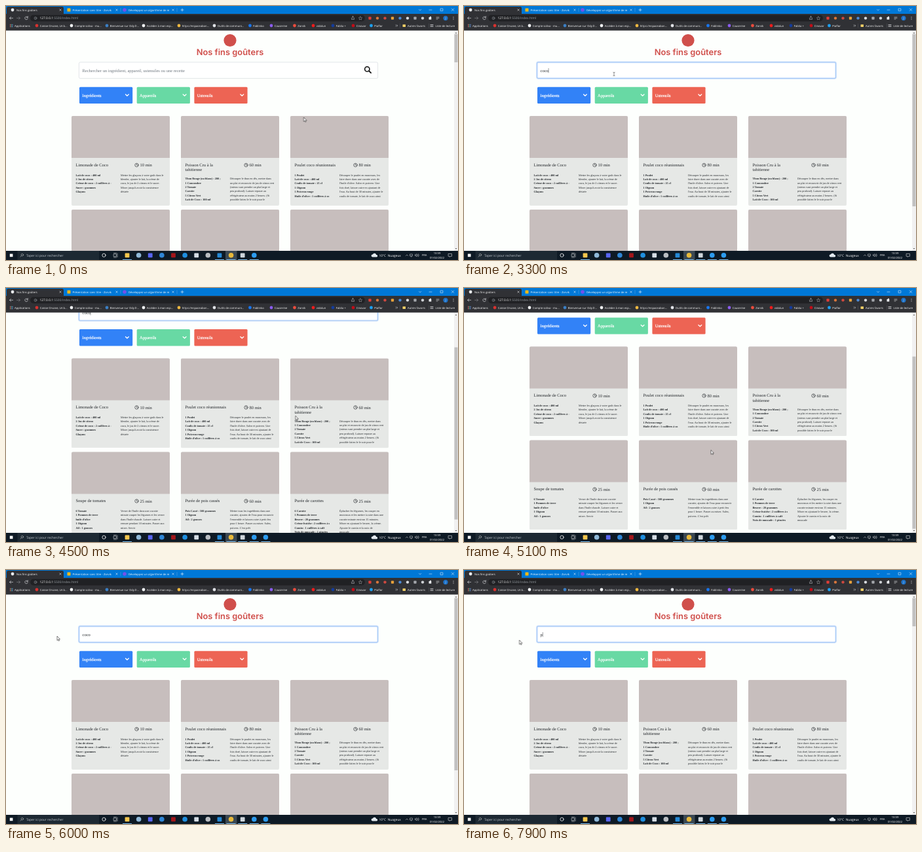
Animation, 690 px wide and 388 px high, one loop 8000 ms. Source, as an HTML page:

```html
<!DOCTYPE html>
<html lang="fr">
<head>
<meta charset="utf-8">
<title>Nos fins goûters</title>
<style>
  @property --scroll { syntax: '<number>'; inherits: true; initial-value: 0; }
  html, body { margin: 0; width: 100%; height: 100%; overflow: hidden; background: #fdfffd; }
  #stage { display: block; width: 690px; height: 388px; animation: scroll 8s linear infinite; }
  text { text-rendering: geometricPrecision; white-space: pre; }
  .ui { font-family: 'Open Sans', 'Noto Sans', sans-serif; font-size: 4.2px; fill: #fff; }
  .serif { font-family: 'Liberation Serif', Tinos, serif; font-size: 6.5px; fill: #212529; }
  .small { font-size: 4.25px; }
  .bold { font-weight: 700; }
  .menu { fill: #fff; stroke: #fff; stroke-width: .2px; }
  .brand { font: 600 12.9px Inter, sans-serif; fill: #d04f4b; text-anchor: middle; }
  .mid { text-anchor: middle; }
  .line { fill: none; stroke-linecap: round; stroke-linejoin: round; }
  #page { transform: translateY(calc(var(--scroll) * -1px)); }
  #thumb { transform: translateY(calc(var(--scroll) * .786px)); }
  #ring { animation: focus 8s linear infinite; }
  #pointer { animation: pointer 8s linear infinite; }
  .right { animation: right 8s step-end infinite; }
  .left { animation: left 8s step-end infinite; }

  @keyframes scroll {
    0%, 50% { --scroll: 0; }
    51.25% { --scroll: 6; }
    53.75% { --scroll: 32; }
    56.25% { --scroll: 60.5; }
    58.75% { --scroll: 76; }
    60%, 66.25% { --scroll: 78.5; }
    68.75% { --scroll: 40; }
    71.25%, 100% { --scroll: 0; }
  }
  @keyframes focus {
    0%, 17.5% { opacity: 0; }
    21.25%, 100% { opacity: 1; }
  }
  @keyframes right {
    0% { transform: none; }
    40% { transform: translateX(167px); }
    96.25%, 100% { transform: none; }
  }
  @keyframes left {
    0% { transform: none; }
    40% { transform: translateX(-167px); }
    96.25%, 100% { transform: none; }
  }
  @keyframes pointer {
    0%, 1.25% { transform: translate(454.5px, 170px); }
    3.75%, 6.25% { transform: translate(370px, 376px); }
    10% { transform: translate(318px, 262px); }
    13.75% { transform: translate(238px, 122px); }
    15%, 38.75% { transform: translate(228px, 103.5px); }
    40%, 50% { transform: translate(229px, 104px); }
    53.75% { transform: translate(370px, 165px); }
    56.25% { transform: translate(442px, 195px); }
    60% { transform: translate(405px, 235px); }
    63.75%, 66.25% { transform: translate(377px, 247.5px); }
    72.5% { transform: translate(94px, 107px); }
    73.75%, 83.75% { transform: translate(78px, 101px); }
    85%, 100% { transform: translate(84.5px, 107px); }
  }
</style>
</head>
<body>
<svg id="stage" viewBox="0 0 690 388" xmlns="http://www.w3.org/2000/svg"></svg>
<script>
const LOOP = 8000;
let css = '', count = 0;

// Returns a class that is visible only during the given [start, end] spans in ms.
function during(...spans) {
  const id = 'on' + count++;
  const at = (t, v) => t < LOOP ? `${t / LOOP * 100}%{opacity:${v}}` : '';
  css += `@keyframes ${id}{0%{opacity:0}${spans.map(([a, b]) => at(a, 1) + at(b, 0)).join('')}}
    .${id}{animation:${id} 8s step-end infinite}`;
  return id;
}

const rect = (x, y, w, h, fill, r = 0, cls = '') =>
  `<rect class="${cls}" x="${x}" y="${y}" width="${w}" height="${h}" rx="${r}" fill="${fill}"/>`;
const dot = (x, y, r, fill) => `<circle cx="${x}" cy="${y}" r="${r}" fill="${fill}"/>`;
const ring = (x, y, r, color, w) => `<circle class="line" cx="${x}" cy="${y}" r="${r}" stroke="${color}" stroke-width="${w}"/>`;
const line = (d, color, w = .6) => `<path class="line" d="${d}" stroke="${color}" stroke-width="${w}"/>`;
const label = (x, y, str, cls = 'ui', style = '') => `<text class="${cls}" x="${x}" y="${y}" style="${style}">${str}</text>`;
const group = (inner, attrs = '') => `<g ${attrs}>${inner}</g>`;
const cross = (x, y, r, color) => line(`M${x - r} ${y - r}l${2 * r} ${2 * r}m0 ${-2 * r}l${-2 * r} ${2 * r}`, color, .5);

function tabs() {
  const close = [83, 169, 255].map(x => cross(x, 6, 1.2, '#fff')).join('');
  return rect(0, 0, 690, 13, '#0078d7') + rect(1, 1, 87, 14, '#303135', 2.5) +
    dot(10, 6, 2.4, '#e8eaed') + label(16, 7.6, 'Nos fins goûters') +
    rect(93.5, 3.5, 5, 5, '#f5ba15', .6) + label(101.5, 7.6, 'Présentation sans titre - Zorvik') +
    dot(181, 6, 2.8, '#7451eb') + label(187, 7.6, 'Développez un algorithme de re') +
    close + line('M175 3.5v5M261 3.5v5', '#7fb5e8', .4) +
    line('M269 4v4M267 6h4', '#fff', .6) +
    line('M630.5 5.2l1.6 1.6 1.6-1.6M646 6h4M663.5 4h3.4v3.4h-3.4z', '#fff', .5) + cross(682, 5.7, 1.8, '#fff');
}

function toolbar() {
  const addons = ['#e23d36', '#d9763c', '#cf4940', '#e9a23b', '#4c8bd8', '#d9dce0', '#a5a8ad', '#d0d3d7'];
  return rect(0, 12, 690, 25.5, '#303135') +
    line('M10.5 18.5h-5l2-2m-2 2l2 2', '#e8eaed') + line('M16.5 18.5h5l-2-2m2 2l-2 2', '#8a8c90') +
    line('M33 17.2a2.3 2.3 0 1 0 .3 2M33.3 15.8v1.8h-1.8', '#e8eaed') +
    rect(37, 13.8, 511, 9.6, '#202124', 4.8) +
    ring(45, 18.6, 2, '#9aa0a6', .5) + line('M45 18.4v1.2M45 17.4v.1', '#9aa0a6', .5) +
    label(51.5, 20.3, '127.0.0.1<tspan fill="#9aa0a6">:5500/index.html</tspan>', 'ui', 'font-size:4.85px') +
    line('M527.5 18v2.5h4V18m-2 1v-3.4m-1 1l1-1 1 1', '#c8cbd0', .5) +
    line('M541 16l.8 1.7 1.9.2-1.4 1.3.4 1.9-1.7-.9-1.7.9.4-1.9-1.4-1.3 1.9-.2z', '#c8cbd0', .4) +
    addons.map((c, i) => i % 3 ? dot(555.5 + i * 11.5, 18.6, 2.2, c) : rect(553.4 + i * 11.5, 16.5, 4.2, 4.2, c, .8)).join('') +
    rect(645.5, 17, 3.8, 3.8, '#e8eaed', .5) + dot(648, 16.8, 1, '#e8eaed') +
    line('M657 17h4M657 18.6h4M657 20.2h2', '#e8eaed', .5) + dot(671, 18.6, 3.6, '#1d72c9') +
    label(671, 20, 'J', 'ui mid') + [16.8, 18.6, 20.4].map(y => dot(683, y, .5, '#e8eaed')).join('');
}

function bookmarks() {
  const items = [
    [47, '#d8322f', 'Caisse Orvane, LA b...'], [100, '#f1f3f4', 'Compte soliva - mu...'],
    [154, '#3b7fc4', 'Bienvenue sur Ody.fr...'], [210, '#f1f3f4', 'Accéder à mon esp...'],
    [264, '#f0b840', 'https://espaceabon...'], [318, '#dfe1e5', 'Outils de communi...'],
    [372.5, '#1877f2', 'Fablinko'], [405, '#8b5cf0', 'Causerine'], [440.5, '#eb4c3d', 'Zorvik'],
    [469, '#f01c1c', 'vidolun'], [499, '#143c9c', 'Fablia +'], [530, '#c20d18', 'Cinovar'], [557.5, '#1da1f2', 'Piaflor']
  ];
  const grid = [0, 1, 2, 3, 4, 5, 6, 7, 8].map(i =>
    rect(6 + i % 3 * 1.7, 27.8 + (i / 3 | 0) * 1.7, 1.1, 1.1, ['#e66', '#5b9', '#69e'][i % 3])).join('');
  return grid + label(13, 31.6, 'Applications') +
    items.map(([x, c, s]) => dot(x, 30, 2.4, c) + label(x + 4.8, 31.6, s)).join('') +
    line('M595 28.8l1.2 1.2-1.2 1.2m1.8-2.4l1.2 1.2-1.2 1.2', '#e8eaed', .5) + line('M601.5 27v6M645.5 27v6', '#5f6368', .4) +
    rect(605.5, 28.2, 4.5, 3.8, '#f3d067', .4) + label(613, 31.6, 'Autres favoris') +
    line('M648 28.5h4M648 30h4M648 31.5h4', '#e8eaed', .6) + label(655.5, 31.6, 'Liste de lecture');
}

const clock = (x, y) => ring(x, y, 2.7, '#212529', .65) + line(`M${x} ${y - 1.6}v1.7l1.1.7`, '#212529', .6);

function card(col, row, title, minutes, parts, steps, cls = '') {
  const x = 100 + col * 167, y = 168 + row * 143;
  const top = y + 91.5 + (title.length - 1) * 5.7;
  const list = (dx, rows, style) => rows.split('|').map((s, i) => label(x + dx, top + i * 6.4, s, 'serif small ' + style)).join('');
  return group(
    rect(x, y, 150, 137, '#e6e8e6', 2) +
    `<path d="M${x} ${y + 64}v-62q0-2 2-2h146q2 0 2 2v62z" fill="#c7bebd"/>` +
    title.map((s, i) => label(x + 6.5, y + 76.6 + i * 7.8, s, 'serif')).join('') +
    clock(x + 99.5, y + 75) + label(x + 104.5, y + 77.3, minutes + ' min', 'serif') +
    list(6.5, parts, 'bold') + list(75, steps, ''), `class="${cls}"`);
}

function cards() {
  return card(0, 0, ['Limonade de Coco'], 10,
      'Lait de coco : 400 ml|2 Jus de citron|Crème de coco : 2 cuillères à -|Sucre : grammes|Glaçons',
      "Mettre les glaçons à votre goût dans le|blender, ajouter le lait, la crème de|coco, le jus de 2 citrons et le sucre.|Mixer jusqu'à avoir la consistence|désirée") +
    card(1, 0, ['Poisson Cru à la', 'tahitienne'], 60,
      'Thon Rouge (ou blanc) : 200 ;|1 Concombre|2 Tomate|Carotte|5 Citron Vert|Lait de Coco : 100 ml',
      'Découper le thon en dés, mettre dans|un plat et recouvrir de jus de citron vert|(mieux vaut prendre un plat large et|peu profond). Laisser reposer au|réfrigérateur au moins 2 heures. (Si|possible faites-le le soir pour le', 'right') +
    card(2, 0, ['Poulet coco réunionnais'], 80,
      "1 Poulet|Lait de coco : 400 ml|Coulis de tomate : 25 cl|1 Oignon|1 Poivron rouge|Huile d'olive : 1 cuillères à so",
      "Découper le poulet en morceaux, les|faire dorer dans une cocotte avec de|l'huile d'olive. Salez et poivrez. Une|fois doré, laisser cuire en ajoutant de|l'eau. Au bout de 30 minutes, ajouter le|coulis de tomate, le lait de coco ainsi", 'left') +
    card(0, 1, ['Soupe de tomates'], 25,
      "6 Tomate|1 Pommes de terre|huile d'olive|1 Oignon|Ail : 1 gousses",
      "Verser de l'huile dans une cocotte|minute couper les légumes et les verser|dans l'huile chaude. Laisser cuire et|remuer pendant 10 minutes. Passer aux|mixer. Servir") +
    card(1, 1, ['Purée de pois cassés'], 60,
      'Pois Cassé : 500 grammes|1 Oignon|Ail : 2 gousses',
      "Mettre tous les ingrédients dans une|cocotte, ajoutez de l'eau pour recouvrir|l'ensemble et laissez cuire à petit feu|pour 1 heure. Passer au mixer. Salez,|poivrez. C'est prêt") +
    card(2, 1, ['Purée de carottes'], 25,
      '6 Carotte|1 Pommes de terre|Beurre : 20 grammes|Crème fraiche : 2 cuillères à s|Cumin : 1 cuillères à café|Noix de muscade : 1 pincées',
      'Éplucher les légumes, les couper en|morceaux et les mettre à cuire dans une|cocotte minute environ 15 minutes.|Mixer en ajoutant le beurre, la crème.|Ajouter le cumin et la noix de|muscade');
}

function search() {
  const left = 116.5, base = 100.7;
  const typed = [
    ['c', [2700, 2900]], ['co', [2900, 3200], [7700, 7800]], ['coc', [3200, 3300]],
    ['coco', [3300, 7700]], ['p', [7900, LOOP]]
  ].map(([s, ...spans]) => label(left, base, s, 'serif ' + during(...spans))).join('');
  const carets = [
    [0, [1400, 1900], [2400, 2700], [7800, 7900]], [2.9, [2700, 2900]], [6.1, [2900, 3200], [7700, 7800]],
    [9, [3200, 3300]], [12.3, [3300, 3900], [4400, 4900], [5400, 5900], [6500, 7000], [7500, 7700]], [3.4, [7900, LOOP]]
  ].map(([dx, ...spans]) => rect(left + dx, 95, .45, 7.2, '#212529', 0, during(...spans))).join('');
  const box = 'x="111.4" y="85.9" width="456.2" height="24.7" rx="2"';
  return `<rect ${box} fill="#fff" stroke="#ced4da" stroke-width=".6"/>` +
    `<g id="ring" fill="none"><rect ${box} stroke="#0d6efd" stroke-opacity=".18" stroke-width="2.6"/><rect ${box} stroke="#9cc4fb" stroke-width=".6"/></g>` +
    group(label(left, base, 'Rechercher un ingrédient, appareil, ustensiles ou une recette', 'serif', 'fill:#6c757d'),
      `class="${during([0, 2700], [7800, 7900])}"`) + typed + carets +
    group(ring(551.3, 96.4, 3.6, '#111', 1.6) + line('M554.2 99.3l2.9 2.9', '#111', 1.8), `class="${during([0, 1400])}"`);
}

function page() {
  const menus = [['Ingrédients', '#3282f7'], ['Appareils', '#68d9a4'], ['Ustensils', '#ed6454']].map(([s, c], i) => {
    const x = 112 + i * 87.7;
    return rect(x, 123.7, 81.2, 25.3, c, 1.5) + label(x + 4.3, 138.5, s, 'serif menu') +
      line(`M${x + 70.5} 135l2.4 2.3 2.4-2.3`, '#fff', 1.3);
  }).join('');
  return group(dot(342, 52.5, 9.6, '#d04f4b') + label(342, 75, 'Nos fins goûters', 'brand') +
    search() + menus + cards(), 'id="page"');
}

function scrollbar() {
  return rect(684, 37.5, 6, 336.5, '#f1f1f1') +
    `<path d="M685.6 41.8l1.4-1.6 1.4 1.6zM685.6 370l1.4 1.6 1.4-1.6z" fill="#505050"/>` +
    rect(684.5, 43, 5, 43, '#c1c1c1', 0, during([0, 3200], [7700, LOOP])) +
    group(group(rect(684.5, 43, 5, 263, '#c1c1c1'), 'id="thumb"'), `class="${during([3200, 7700])}"`);
}

function taskbar() {
  const apps = ['#f4c64e', '#8fb8d8', '#5865f2', '#2f86d6', '#a3161b', '#1f8fe0', '#d5dde5', '#b9bdc2', '#2589d6', '#e8b93a', '#cfd6dc', '#2d9cf0', '#2d9cf0'];
  const open = [0, 8, 9, 10, 11];
  const icon = (c, i) => {
    const x = 185 + i * 17.62;
    const mark = i % 2 || i > 10 ? dot(x, 380.8, 3.8, c) : rect(x - 3.4, 377.4, 6.8, 6.8, c, 1);
    const under = open.includes(i) || i > 11 ? rect(x - 7, 387, 14, 1, '#76b9ed') : '';
    return i > 11 ? group(mark + under, `class="${during([300, LOOP])}"`) : mark + under;
  };
  return rect(0, 374, 690, 14, '#0e1a25') + rect(5.8, 378.6, 4.6, 4.6, '#fff') + rect(17.5, 374, 124.5, 14, '#1d2933') +
    ring(24.8, 380.2, 1.7, '#ddd', .5) + line('M23.5 381.5l-1.6 1.7', '#ddd', .5) +
    label(31, 382.7, 'Taper ici pour rechercher', 'ui', 'font-size:4.85px;fill:#c3c9cf') +
    ring(149.5, 380.8, 2.6, '#fff', .8) +
    line('M164.5 379h4v3.6h-4zM164.5 377.5h4M164.5 384.1h4M170 378v5.6', '#fff', .5) +
    rect(335, 374, 17.5, 14, '#3b4853', 0, during([0, 300], [1500, LOOP])) +
    rect(387.8, 374, 17.5, 14, '#4a5863', 0, during([300, 1500])) +
    apps.map(icon).join('') +
    `<path d="M559.5 383.5a2 2 0 0 1 .3-4 2.9 2.9 0 0 1 5.4.4 1.8 1.8 0 0 1 .4 3.6z" fill="#e3eaf0"/>` +
    label(569.5, 382.6, '10°C  Nuageux', 'ui', 'font-size:4.85px') +
    line('M610.3 381.6l1.7-1.7 1.7 1.7M617 379h3.4v3h-3.4zM618.7 382v1.3M624.5 380v1.6h1l1.4 1.3v-4.2l-1.4 1.3zM628.4 379.5q1 1.3 0 2.6M629.6 378.7q1.7 2.1 0 4.2', '#fff', .45) +
    label(635, 382.4, 'FRA') +
    label(658, 379.4, '13:59', 'ui mid') + label(658, 385.9, '01/02/2022', 'ui mid') +
    line('M675.5 378.5h5v3.8h-2l-1.2 1.2v-1.2h-1.8z', '#fff', .5);
}

function pointer() {
  const arrow = `<path d="M0 0v6.6l1.5-1.4 1 2.2 1-.5-1-2.1h2z" fill="#fff" stroke="#000" stroke-width=".5" stroke-linejoin="round"/>`;
  const beam = line('M-1.2-2.8q1.2 0 1.2.6v4.4q0 .6-1.2.6M1.2-2.8q-1.2 0-1.2.6M0 2.2q0 .6 1.2.6', '#222', .5);
  return group(group(arrow, `class="${during([0, 1150], [4100, LOOP])}"`) +
    group(beam, `class="${during([1150, 4100])}"`), 'id="pointer"');
}

document.getElementById('stage').innerHTML =
  rect(0, 37, 690, 337, '#fdfffd') +
  `<svg x="0" y="37.5" width="690" height="336.5" viewBox="0 37.5 690 336.5">${page()}</svg>` +
  scrollbar() + tabs() + toolbar() + bookmarks() + taskbar() + pointer();
document.head.appendChild(document.createElement('style')).textContent = css;
</script>
</body>
</html>
```
